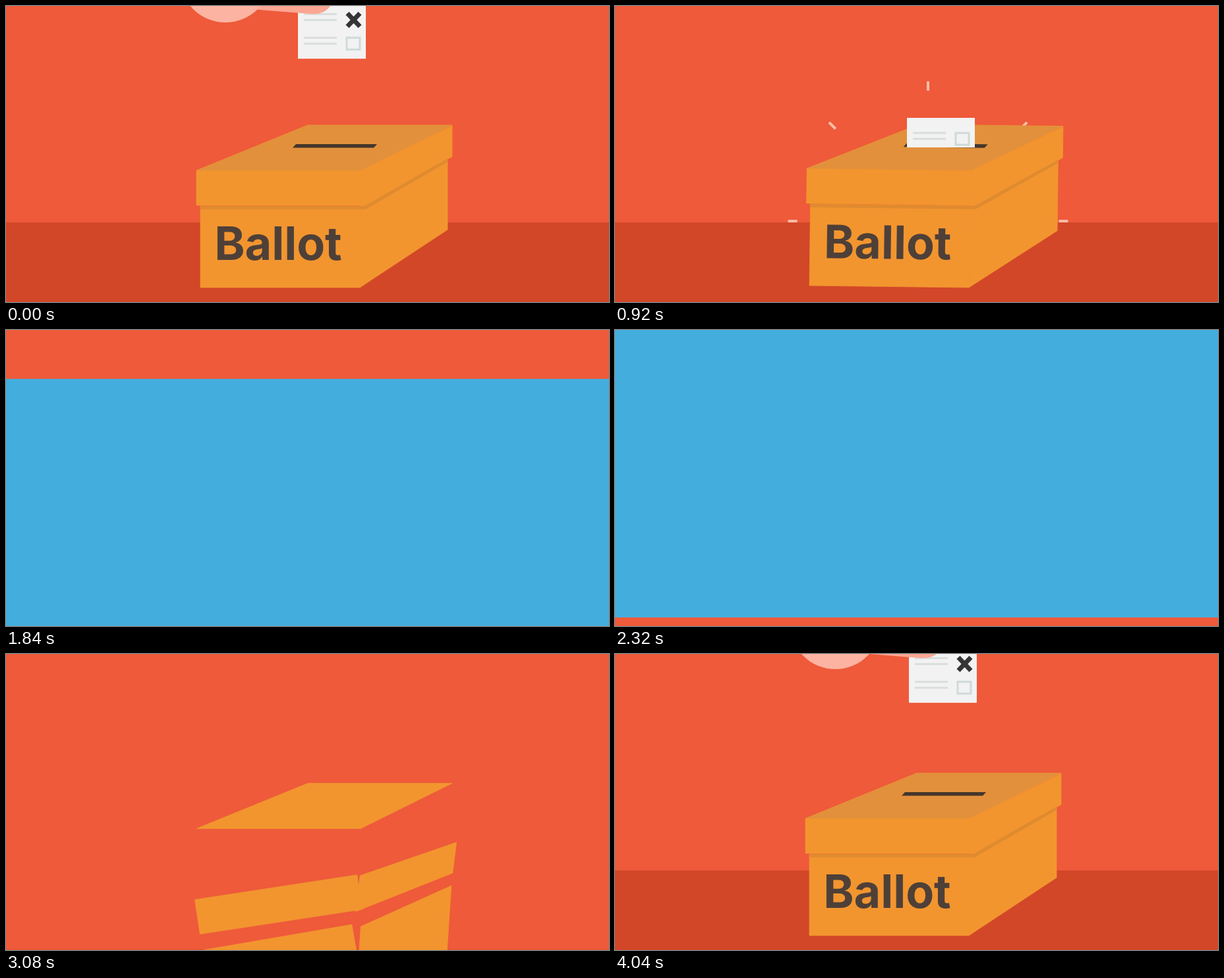
These frames come from a looping animation (915 by 450 pixels, 4080 ms). An HTML page with a canvas:

```html
<!DOCTYPE html>
<html lang="en">
<head>
<meta charset="utf-8">
<title>Ballot box</title>
<style>
  html, body { margin: 0; width: 100%; height: 100%; overflow: hidden; background: #ee5a3a; }
  canvas { display: block; }
</style>
</head>
<body>
<canvas id="stage" width="915" height="450"></canvas>
<script>
const ctx = document.getElementById('stage').getContext('2d');
const W = 915, H = 450, LOOP = 4080;
const WALL = '#ee5a3a', FLOOR = '#d24728', BLUE = '#43aedd', BOX = '#f2952f';
const SHADE = '#e2903c', SEAM = '#e08a30', INK = '#4e4038', SLOT = '#44362b';

// Box panels: corners, start and end time, rise distance, starting tilt in degrees
const panels = [
  { pts: [295, 304, 537, 304, 537, 428, 295, 428], from: 2840, to: 3640, rise: 260, tilt: -20 },
  { pts: [537, 304, 670, 233, 670, 340, 537, 428], from: 2840, to: 3620, rise: 240, tilt: 8 },
  { pts: [289, 250, 538, 250, 538, 303, 289, 303], from: 2720, to: 3600, rise: 300, tilt: -25 },
  { pts: [538, 250, 677, 182, 677, 229, 538, 305], from: 2680, to: 3600, rise: 300, tilt: 22 },
  { pts: [458, 181, 677, 181, 538, 250, 289, 250], from: 2640, to: 3220, rise: 270, tilt: 0 }
];

const progress = (t, from, to) => Math.min(1, Math.max(0, (t - from) / (to - from)));
const remain = (t, from, to) => (1 - progress(t, from, to)) ** 2;
const easeInOut = (p, n = 2.65) =>
  p < 0.5 ? 2 ** (n - 1) * p ** n : 1 - 2 ** (n - 1) * (1 - p) ** n;
const rad = deg => deg * Math.PI / 180;

function rect(color, x, y, w, h) {
  ctx.fillStyle = color;
  ctx.fillRect(x, y, w, h);
}

function poly(color, pts) {
  ctx.beginPath();
  for (let i = 0; i < pts.length; i += 2) ctx.lineTo(pts[i], pts[i + 1]);
  ctx.closePath();
  ctx.fillStyle = color;
  ctx.fill();
}

function line(color, width, ...pts) {
  ctx.beginPath();
  for (let i = 0; i < pts.length; i += 4) {
    ctx.moveTo(pts[i], pts[i + 1]);
    ctx.lineTo(pts[i + 2], pts[i + 3]);
  }
  ctx.strokeStyle = color;
  ctx.lineWidth = width;
  ctx.stroke();
}

// Draws with the origin at (x, y), turned and scaled
function at(x, y, deg, scale, draw) {
  ctx.save();
  ctx.translate(x, y);
  ctx.rotate(rad(deg));
  ctx.scale(scale, scale);
  draw();
  ctx.restore();
}

function drawPanel({ pts, from, to, rise, tilt }, t) {
  const r = remain(t, from, to);
  if (r === 1) return;
  const cx = (pts[0] + pts[4]) / 2, cy = (pts[1] + pts[5]) / 2;
  at(cx, cy + rise * r, tilt * r, 1, () => {
    poly(BOX, pts.map((v, i) => v - (i % 2 ? cy : cx)));
    ctx.strokeStyle = BOX;
    ctx.lineWidth = 0.8;
    ctx.stroke();
  });
}

function drawBox(t) {
  for (const panel of panels) drawPanel(panel, t);

  ctx.globalAlpha = progress(t, 3480, 3720);
  poly(SHADE, panels[4].pts);
  poly(SEAM, [295, 304, 544, 304, 670, 232, 670, 237, 546, 309, 295, 309]);
  ctx.globalAlpha = 1;

  if (t > 3280) {
    const r = remain(t, 3280, 3520);
    at(499 - 45 * r, 212.5 + 22 * r, 54 * r, 1 - 0.63 * r,
      () => poly(SLOT, [-59, -2.5, 64, -2.5, 59, 3, -64, 3]));
  }

  const p = progress(t, 3360, 3560);
  at(413 - 3 * (1 - p), 361 + 10 * (1 - p), -8 * (1 - p), 0.65 + 0.35 * p, () => {
    ctx.globalAlpha = p;
    ctx.fillStyle = INK;
    ctx.font = '700 70px Inter, "Open Sans", sans-serif';
    ctx.textAlign = 'center';
    ctx.fillText('Ballot', 0, 25);
  });
}

function drawBurst(age) {
  if (age < 0 || age > 900) return;
  for (let i = 0; i < 8; i++) {
    at(475, 327, i * 45, 1, () => rect('#f9bda6', 0.63 * age - 7, -2, 14, 4));
  }
}

function drawPaper(x, bottom) {
  ctx.save();
  ctx.beginPath();
  ctx.rect(0, 0, W, 215);
  ctx.clip();
  ctx.translate(x, bottom);
  rect('#f2f2f2', 0, -127, 103, 127);
  for (let row = 0; row < 3; row++) {
    const y = -23 - 36 * row;
    line('#dadddd', 3, 9, y - 9, 59, y - 9, 9, y, 59, y);
    if (row === 1) {
      line('#353535', 7, 75, y - 10, 94, y + 10, 94, y - 10, 75, y + 10);
    } else {
      ctx.strokeStyle = '#d0d9da';
      ctx.lineWidth = 3;
      ctx.strokeRect(74, y - 9, 20, 18);
    }
  }
  ctx.restore();
}

function drawFinger(x, y) {
  at(x, y, 0, 1, () => {
    ctx.beginPath();
    ctx.moveTo(340, -60);
    ctx.lineTo(375, 5);
    ctx.lineTo(462, 12);
    ctx.quadraticCurveTo(484, 14, 494, -3);
    ctx.lineTo(490, -60);
    ctx.fillStyle = '#fba794';
    ctx.fill();
  });
}

function drawPalm(x, y) {
  ctx.beginPath();
  ctx.arc(333 + x, -44 + y, 69, 0, 2 * Math.PI);
  ctx.fillStyle = '#fdb3a1';
  ctx.fill();
}

function drawHand(t) {
  if (t < 3780) return;
  const r = remain(t, 3780, 4140) - remain(LOOP, 3780, 4140);
  const fall = Math.max(0, t - LOOP);
  const entry = fall ? 0 : r;
  const lift = 0.1 * fall - 0.0006 * fall * fall;
  drawPaper(443 + 62 * entry, 80 - 122 * entry + 0.15 * fall + 0.000093 * fall * fall);
  drawFinger(30 * entry, lift - 122 * entry);
  drawPalm(30 * entry, lift - 41 * entry);
}

function drawScene(t) {
  rect(WALL, 0, 0, W, H);
  const floorY = 329 + 121 * (1 - progress(t, 3080, 3760)) ** 3;
  rect(FLOOR, 0, floorY, W, H - floorY);

  const hit = t - LOOP - 595;
  drawBurst(hit);
  const wobble = 0.7 * Math.sin(Math.PI * progress(hit, 0, 650));
  at(537, 428, wobble, 1, () => {
    ctx.translate(-537, -428);
    drawBox(t);
  });
  drawHand(t);
}

function wipe(color, p) {
  const h = H * easeInOut(p);
  rect(color, 0, H - h, W, h);
}

function frame(now) {
  const t = now % LOOP;
  if (t < 1920) {
    drawScene(t + LOOP); // continues from the built box at the loop's end
    wipe(BLUE, progress(t, 1680, 1920));
  } else if (t < 2520) {
    rect(BLUE, 0, 0, W, H);
    wipe(WALL, progress(t, 2280, 2520));
  } else {
    drawScene(t);
  }
}

const start = performance.now();
function tick() {
  frame(performance.now() - start);
  requestAnimationFrame(tick);
}
tick();
</script>
</body>
</html>
```
